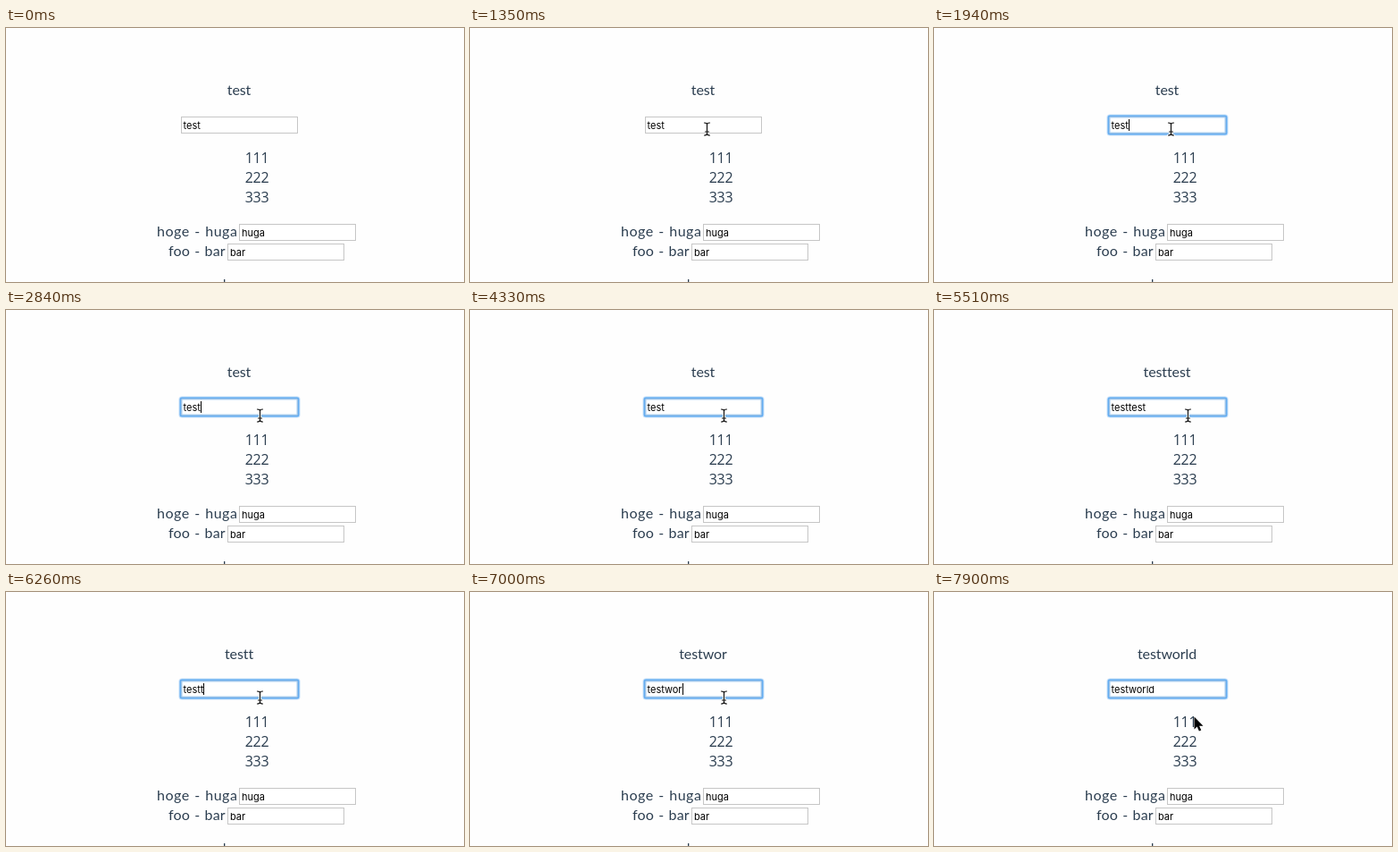
Recreate the animation shown at these times as an HTML page. Size 513 by 284 pixels, loop 8000 ms.

```html
<!DOCTYPE html>
<html lang="en">
<head>
<meta charset="utf-8">
<title>Bound input</title>
<style>
  html, body { margin: 0; width: 100%; height: 100%; overflow: hidden; background: #fefefe; }
  svg { display: block; width: 513px; height: 284px; }
  text { white-space: pre; }
  .label { font: 16px Lato, sans-serif; fill: #2c3e50; }
  .digits { font: 16px "Open Sans", sans-serif; letter-spacing: -.25px; fill: #2c3e50; }
  .mid { text-anchor: middle; }
  .value { font: 11px Inter, sans-serif; fill: #000; }
  .box { fill: #fff; stroke: #c6c6c6; }
  .ring { fill: none; }
</style>
</head>
<body>
<svg viewBox="0 0 513 284">
  <rect width="513" height="284" fill="#fefefe"/>
  <text id="title" class="label mid" x="261" y="75" letter-spacing="-.1"></text>

  <rect class="box" x="196.5" y="99.5" width="130" height="18"/>
  <g id="focus">
    <rect class="ring" x="194.5" y="97.5" width="134" height="22" rx="2.5" stroke="#c3dffa" stroke-width="2"/>
    <rect class="ring" x="195.5" y="98.5" width="132" height="20" rx="1.5" stroke="#66adf0" stroke-width="2"/>
    <rect class="ring" x="197" y="100" width="129" height="17" stroke="#a9d0f5"/>
  </g>
  <text id="value" class="value" x="198.5" y="113"></text>
  <rect id="caret" y="102" width="1" height="13"/>

  <text class="digits mid" x="281" y="151">111</text>
  <text class="digits mid" x="281" y="173">222</text>
  <text class="digits mid" x="281" y="195">333</text>

  <text class="label" x="169" y="233" letter-spacing=".5" word-spacing="1">hoge - huga</text>
  <rect class="box" x="261.5" y="219.5" width="130" height="18"/>
  <text class="value" x="264" y="233">huga</text>

  <text class="label" x="182" y="255" letter-spacing=".15" word-spacing="1">foo - bar</text>
  <rect class="box" x="248.5" y="241.5" width="130" height="18"/>
  <text class="value" x="251" y="255">bar</text>

  <rect x="244" y="281" width="1.3" height="3" fill="#2c3e50"/>

  <g id="beam" fill="none" stroke-linecap="round">
    <path id="stem" stroke="#fff" stroke-width="2.6" d="M-3-7Q0-7 0-5Q0-7 3-7M0-5V5Q0 7-3 7M0 5Q0 7 3 7M-2 3H2"/>
    <use href="#stem"/>
    <path stroke="#111" stroke-width="1.2" d="M-3-7Q0-7 0-5Q0-7 3-7M0-5V5Q0 7-3 7M0 5Q0 7 3 7M-2 3H2"/>
  </g>
  <path id="arrow" d="M0 0V14L3.2 11L5.4 16L7.8 15L5.6 10.2H10Z" fill="#000" stroke="#fff" stroke-width="1" paint-order="stroke"/>
</svg>
<script>
const LOOP = 8000;
const FOCUS_AT = 1940;
const $ = id => document.getElementById(id);

// Each track holds [start ms, state...]; a state lasts until the next one.
const typing = [
  [0, "test"],
  [4470, "testt"], [4610, "testte"], [4760, "testtes"], [5060, "testtest"],
  [5960, "testtes"], [6110, "testte"], [6260, "testt"], [6410, "test"],
  [6560, "testw"], [6700, "testwo"], [7000, "testwor"], [7150, "testworl"], [7450, "testworld"]
];
const blink = [
  [0, false], [1940, true], [2390, false], [2840, true], [3430, false],
  [3880, true], [4330, false], [4470, true], [5510, false], [5960, true], [7900, false]
];
const pointer = [
  [0, "none", 0, 0],
  [900, "arrow", 324, 166], [1050, "arrow", 294, 141],
  [1200, "beam", 272, 117], [1350, "beam", 265.5, 113],
  [2090, "beam", 272, 115], [2240, "beam", 281, 117], [2390, "beam", 284.5, 118],
  [7900, "arrow", 291.5, 139.5]
];

const at = (track, t) => track.filter(step => step[0] <= t).pop();
const show = (el, on) => el.setAttribute("visibility", on ? "visible" : "hidden");

function draw(t) {
  const word = at(typing, t)[1];
  const value = $("value");
  $("title").textContent = word;
  value.textContent = word;

  show($("focus"), t >= FOCUS_AT);
  $("caret").setAttribute("x", Math.round(198.5 + value.getComputedTextLength()));
  show($("caret"), at(blink, t)[1]);

  const [, kind, x, y] = at(pointer, t);
  for (const id of ["beam", "arrow"]) {
    $(id).setAttribute("transform", `translate(${x} ${y})`);
    show($(id), kind === id);
  }
}

const start = performance.now();
function tick() {
  draw((performance.now() - start) % LOOP);
  requestAnimationFrame(tick);
}
tick();
</script>
</body>
</html>
```
